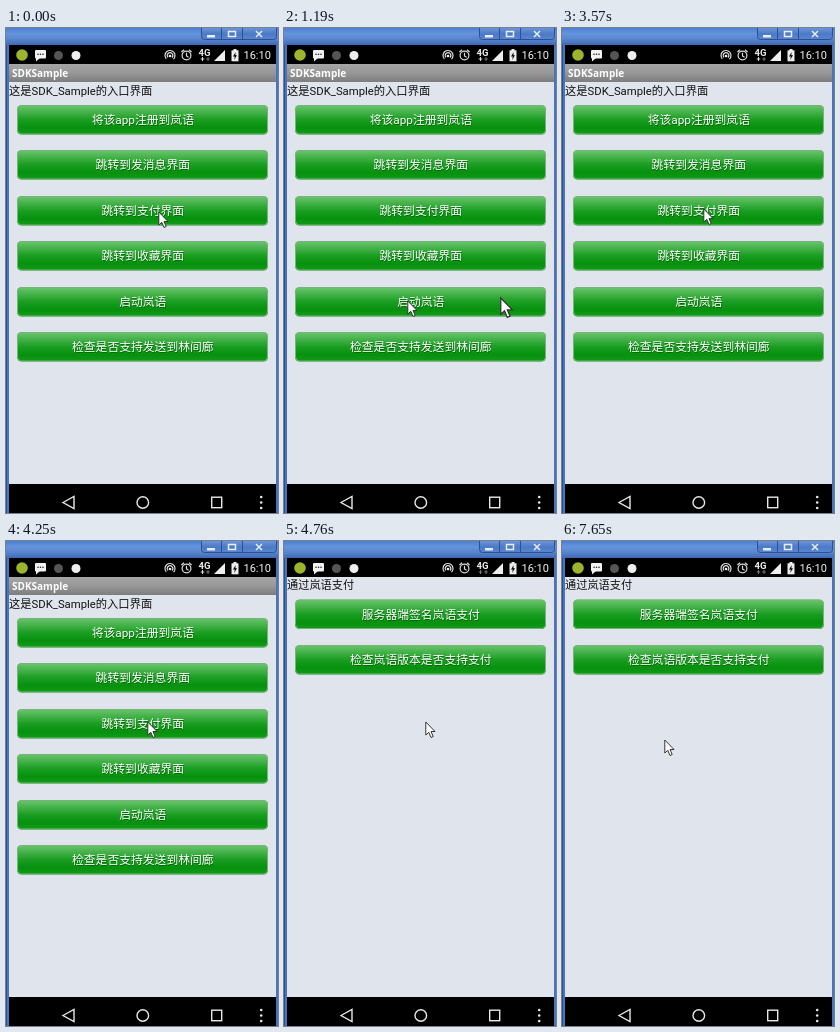
Write an HTML page with a canvas that moves like this. It is 272 by 485 pixels and loops after 7.99 s.

```html
<!DOCTYPE html>
<html lang="zh">
<head>
<meta charset="utf-8">
<style>
html, body { margin: 0; width: 100%; height: 100%; overflow: hidden; background: #000; }
canvas { display: block; width: 272px; height: 485px; }
</style>
</head>
<body>
<canvas id="stage" width="272" height="485"></canvas>
<script>
const ctx = document.getElementById('stage').getContext('2d');
const LOOP = 7990, STEP = 170;
const SANS = 'Roboto, "Noto Sans CJK SC", "Noto Sans CJK", sans-serif';
const MAIN = ['将该app注册到岚语', '跳转到发消息界面', '跳转到支付界面', '跳转到收藏界面', '启动岚语', '检查是否支持发送到林间廊'];
const PAY = ['服务器端签名岚语支付', '检查岚语版本是否支持支付'];

const PATH = [[153, 184], [158, 158], [148, 120], [112, 168], [95, 235], [124, 273], [185, 312], [217, 270],
  [226, 318], [205, 390], [140, 408], [75, 360], [65, 285], [110, 230], [185, 183], [142, 181]];

function fade(y0, y1, ...colors) {
  const g = ctx.createLinearGradient(0, y0, 0, y1);
  colors.forEach((c, i) => g.addColorStop(i / (colors.length - 1), c));
  return g;
}

function rect(x, y, w, h, fill) {
  ctx.fillStyle = fill;
  ctx.fillRect(x, y, w, h);
}

function round(x, y, w, h, r) {
  ctx.beginPath();
  ctx.roundRect(x, y, w, h, r);
}

function dot(x, y, r, fill) {
  ctx.beginPath();
  ctx.arc(x, y, r, 0, Math.PI * 2);
  ctx.fillStyle = fill;
  ctx.fill();
}

function ring(x, y, r, a = 0, b = Math.PI * 2) {
  ctx.beginPath();
  ctx.arc(x, y, r, a, b);
  ctx.stroke();
}

function poly(points, fill) {
  ctx.beginPath();
  points.forEach(([x, y]) => ctx.lineTo(x, y));
  ctx.closePath();
  if (fill) {
    ctx.fillStyle = fill;
    ctx.fill();
  }
}

function line(...points) {
  ctx.beginPath();
  points.forEach(([x, y]) => ctx.lineTo(x, y));
  ctx.stroke();
}

function pen(color, width) {
  ctx.strokeStyle = color;
  ctx.lineWidth = width;
}

function text(str, x, y, font, fill, align = 'left') {
  ctx.font = font;
  ctx.textAlign = align;
  ctx.fillStyle = fill;
  ctx.fillText(str, x, y);
}

function button(label, y, pressed) {
  round(11, y, 251, 29.5, 4.5);
  ctx.fillStyle = pressed
    ? fade(y, y + 30, '#3d8f40', '#197a1f', '#06680b', '#0a700f')
    : fade(y, y + 30, '#6cc56f', '#43b148', '#199d21', '#07910e', '#149a1a');
  ctx.fill();
  pen('#76b57a', 1);
  round(11.5, y + .5, 250, 28.5, 4);
  ctx.stroke();
  text(label, 137.3, y + 20, `11.8px ${SANS}`, 'rgba(0,60,0,.6)', 'center');
  text(label, 136.8, y + 19.3, `11.8px ${SANS}`, '#fff', 'center');
}

function mainPage(pressed) {
  rect(3, 36, 267, 420, '#e0e4ec');
  rect(3, 36, 267, 18, fade(36, 54, '#a6a6a6', '#979797', '#7d7d7d'));
  text('SDKSample', 6, 48.5, 'bold 10px "Open Sans", sans-serif', '#fff');
  text('这是SDK_Sample的入口界面', 3, 66.5, `11.3px ${SANS}`, '#111');
  MAIN.forEach((s, i) => button(s, 77 + Math.round(i * 45.4), pressed && i === 2));
}

function payPage(offset, veil) {
  ctx.save();
  ctx.translate(0, offset);
  ctx.globalAlpha = veil;
  rect(3, 36, 267, 420 - offset, '#e0e4ec');
  ctx.globalAlpha = 1;
  text('通过岚语支付', 3, 48, `11.2px ${SANS}`, '#111');
  PAY.forEach((s, i) => button(s, 58.5 + i * 45.5));
  ctx.restore();
}

function windowFrame() {
  rect(0, 0, 272, 485, '#4a73bd');
  rect(0, 0, 272, 17, fade(0, 17, '#4b7fd0', '#6694dc', '#5784cd', '#4069b4'));
  rect(0, 17, 1, 468, '#2c4f92');
  round(195.5, -4, 75, 15.5, 3);
  ctx.fillStyle = fade(0, 12, '#6b95da', '#4c7ac6', '#5a87d0');
  ctx.fill();
  pen('#2b5096', 1);
  ctx.stroke();
  line([215.5, 0], [215.5, 11]);
  line([236.5, 0], [236.5, 11]);
  rect(201, 7, 8, 2.5, '#e8eefa');
  pen('#e8eefa', 1.5);
  ctx.strokeRect(222.5, 3.5, 7, 5);
  line([250, 3], [256, 9]);
  line([256, 3], [250, 9]);
}

function statusBar(busy) {
  rect(3, 17, 267, 19, '#000');
  dot(16, 27, 5.8, '#9db52c');
  round(29, 22, 11, 8.5, 1);
  ctx.fillStyle = '#f2f2f2';
  ctx.fill();
  poly([[30, 30], [34, 30], [30, 33.5]], '#f2f2f2');
  [32, 34.5, 37].forEach(x => dot(x, 26.3, .8, '#222'));
  dot(52.5, 27.5, 4.5, '#555');
  dot(70, 27.5, 4.5, '#eee');

  // Hotspot
  pen('#ddd', 1.2);
  ring(164, 27.5, 5, 2.4, 7.1);
  ring(164, 27.5, 2.8, 2.4, 7.1);
  dot(164, 28, 1.3, '#eee');

  // Alarm
  ring(180.5, 27.5, 4.4);
  line([180.5, 24.8], [180.5, 28], [182.6, 29.2]);
  line([175.4, 24], [178, 21.8]);
  line([183, 21.8], [185.6, 24]);

  text('4G', 192.5, 27.5, `bold 9.5px ${SANS}`, '#eee');
  pen(busy ? '#ddd' : '#777', 1);
  line([196.5, 29], [196.5, 33]);
  line([194.7, 31], [198.3, 31]);
  pen('#777', 1);
  line([202, 29], [202, 33]);
  line([200.2, 31], [203.8, 31]);
  poly([[219, 22], [219, 33], [208, 33]], '#eee');

  // Battery
  rect(227.5, 21, 3, 2, '#eee');
  rect(225.5, 22.3, 7, 11, '#eee');
  poly([[229.7, 24], [227, 28.5], [228.8, 28.5], [228.2, 32], [231, 27.3], [229.3, 27.3]], '#000');
  text('16:10', 237.5, 31.2, `11px ${SANS}`, '#f4f4f4');
}

function navBar() {
  rect(3, 456, 267, 29, '#000');
  pen('#e8e8e8', 1.4);
  poly([[57, 474.5], [68, 468.5], [68, 480.5]]);
  ctx.stroke();
  ring(136.8, 474.5, 5.8);
  ctx.strokeRect(205.7, 469.2, 10, 10.5);
  [469, 474.5, 480].forEach(y => dot(255.2, y, 1.3, '#e8e8e8'));
}

function pointer(x, y, scale = 1) {
  ctx.save();
  ctx.translate(x - .2, y);
  ctx.scale(scale, scale);
  poly([[0, 0], [0, 13], [3, 10.3], [5.2, 15.5], [7.4, 14.5], [5.2, 9.5], [9.2, 9.5]], '#fff');
  pen('#333', 1);
  ctx.stroke();
  ctx.restore();
}

function draw(t) {
  const step = Math.floor(t / STEP);
  windowFrame();
  if (t < 4760) mainPage(t >= 4080 && t < 4250);
  if (t >= 4760) payPage(0, 1);
  else if (t >= 4590) payPage(9.5, .84);
  statusBar(t < 4760);
  navBar();

  if (t >= 850 && t < 3060) pointer(124, 273);
  if (step >= 45) pointer(103, 199);
  else if (step === 44) pointer(121, 191);
  else pointer(...PATH[Math.min(step, PATH.length - 1)], step === 7 ? 1.25 : 1);
}

const start = performance.now();
function tick() {
  draw((performance.now() - start) % LOOP);
  requestAnimationFrame(tick);
}
tick();
</script>
</body>
</html>
```
